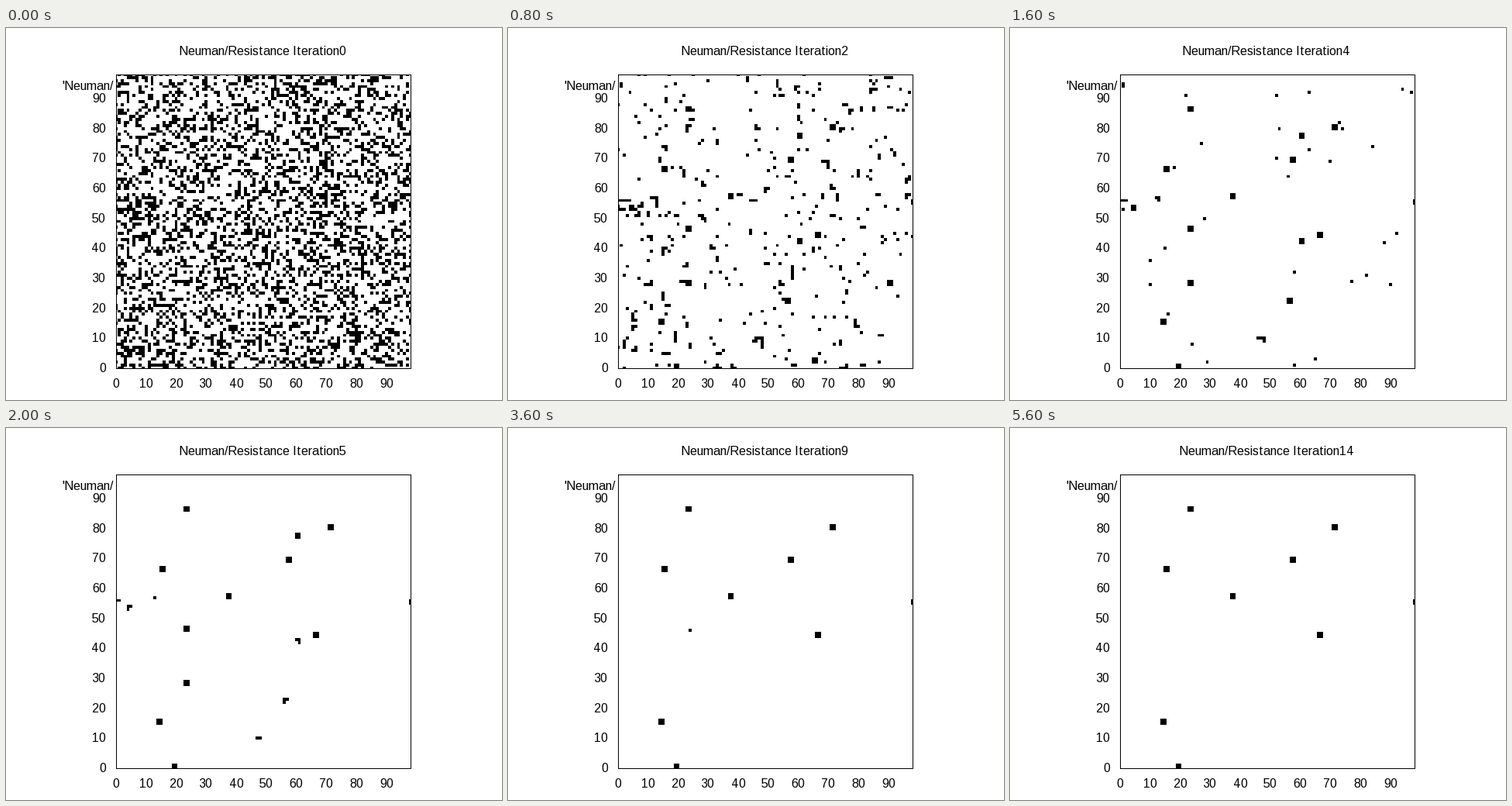
These frames come from a looping animation (640x480 px, 6 s). A matplotlib script:

```python
import numpy as np
import matplotlib.pyplot as plt
from matplotlib.animation import FuncAnimation

W, H, DPI = 640, 480, 100
STEPS, INTERVAL = 15, 400
GRID, SPAN = 100, 98
LEFT, RIGHT, TOP, BOTTOM = 142, 522, 60, 439
START_CELLS, SURVIVAL = 3300, 0.38

# Lower-left corners of the stable 2x2 blocks.
BLOCKS = [(23, 86), (71, 80), (15, 66), (57, 69), (37, 57),
          (66, 44), (14, 15), (19, 0), (98, 55)]


def neighbours(cells):
    return sum(np.roll(cells.astype(int), shift, axis)
               for axis in (0, 1) for shift in (-1, 1))


def fittest(score, count):
    cells = np.zeros(GRID * GRID, bool)
    cells[np.argsort(score.ravel())[GRID * GRID - count:]] = True
    return cells.reshape(GRID, GRID)


def simulate():
    """Crowding rule on four neighbours, with a random resistance per cell."""
    rng = np.random.default_rng(14)
    stable = np.zeros((GRID, GRID), bool)
    for x, y in BLOCKS:
        stable[y:y + 2, x:x + 2] = True
    resistance = rng.random((GRID, GRID))
    states = [fittest(rng.random((GRID, GRID)), START_CELLS)]
    for step in range(1, STEPS):
        alive, n = states[-1], neighbours(states[-1])
        viable = (n == 3) | (alive & (n == 2))
        score = (alive | viable) * (1.0 * alive + viable + 2 * resistance)
        score[stable] = np.inf
        count = round(START_CELLS * SURVIVAL ** step) + stable.sum()
        states.append(fittest(score, count))
    return states


states = simulate()

plt.rcParams.update({"font.family": "Liberation Sans",
                     "font.size": 16 * 72 / DPI,
                     "text.hinting_factor": 1})
fig = plt.figure(figsize=(W / DPI, H / DPI), dpi=DPI, facecolor="white")
ax = fig.add_axes([LEFT / W, 1 - BOTTOM / H, (RIGHT - LEFT) / W, (BOTTOM - TOP) / H])
image = ax.imshow(states[0], cmap="binary", vmin=0, vmax=1, origin="lower",
                  interpolation="nearest", aspect="auto",
                  extent=(-0.5, GRID - 0.5, -0.5, GRID - 0.5))
ax.set(xlim=(0, SPAN), ylim=(0, SPAN), xticks=[], yticks=[])
for spine in ax.spines.values():
    spine.set_linewidth(72 / DPI)


def label(x, baseline, text, ha="center"):
    return fig.text(x / W, 1 - baseline / H, text, ha=ha, va="baseline")


for value in range(0, SPAN, 10):
    label(LEFT + value * (RIGHT - LEFT) / SPAN, 464, str(value))
    label(129, BOTTOM + 5 - value * (BOTTOM - TOP) / SPAN, str(value), "right")
label(72.5, 79.6, "'Neuman/", "left")
title = label(331, 35, "")


def draw(step):
    image.set_data(states[step])
    title.set_text(f"Neuman/Resistance Iteration{step}")
    return image, title


animation = FuncAnimation(fig, draw, frames=STEPS, interval=INTERVAL,
                          repeat=True, repeat_delay=0)
plt.show()
```
